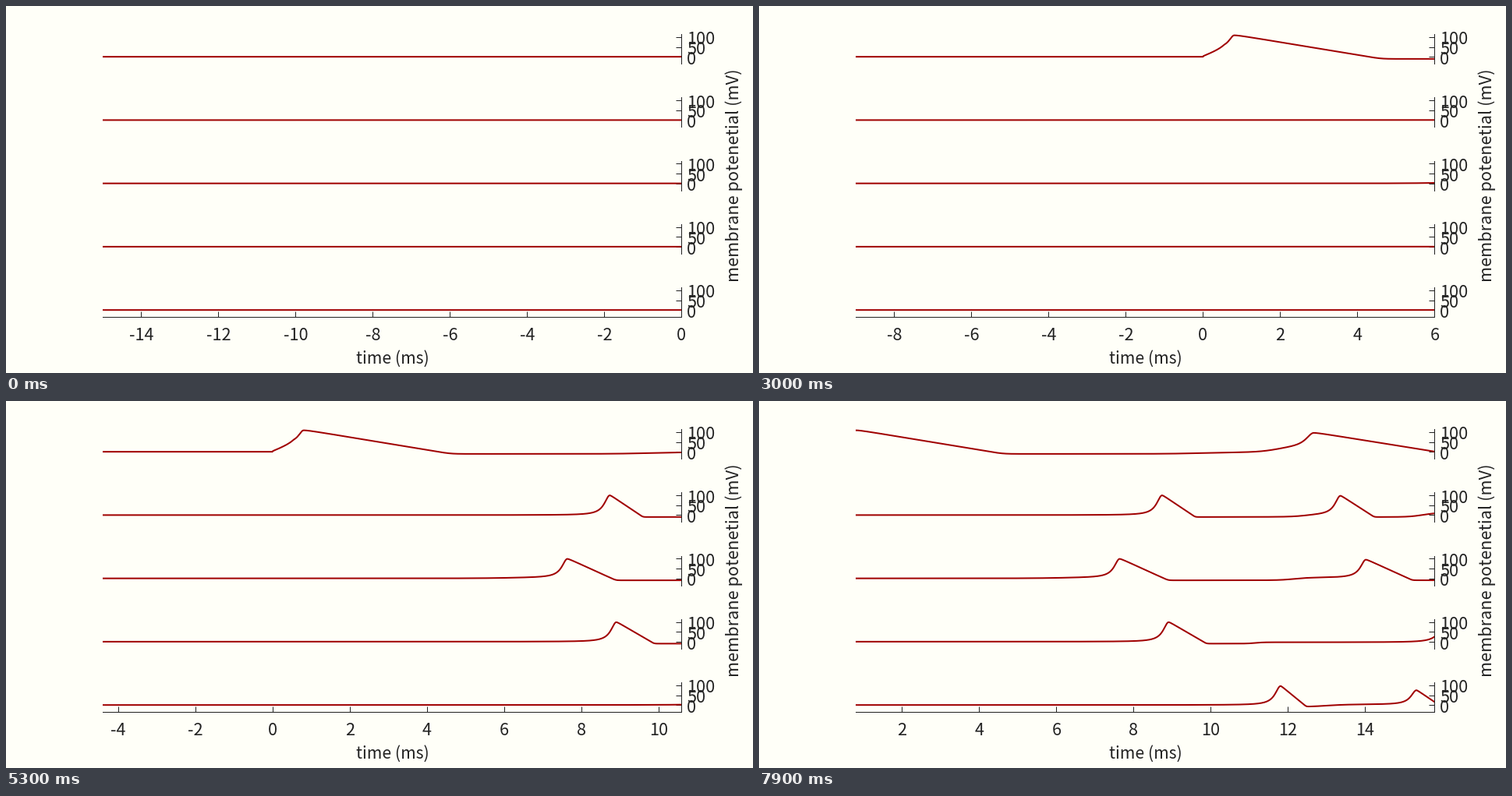
Recreate the animation shown at these times as a matplotlib script. Size 958 by 471 pixels, loop 8 s.

```python
import numpy as np
import matplotlib.pyplot as plt
from matplotlib.animation import FuncAnimation

W, H, DPI = 958, 471, 64
PX = 72 / DPI                      # points per pixel
FRAMES, STEP, SPAN = 80, 0.2, 15   # simulated ms per frame, visible ms
LEFT, WIDTH = 123.9, 742.5
HEIGHT, PITCH, BASE = 37.9, 81.25, 399.0
PAPER, INK, RED = "#fffff8", "#222222", "#a00000"

plt.rcParams.update({
    "font.family": "Noto Sans CJK JP",
    "text.color": INK,
    "axes.edgecolor": INK,
    "axes.linewidth": PX,
})

time = np.linspace(-SPAN, 16, 3101)


def push(v, at, size, width=0.18):
    """Sigmoid step of the membrane potential."""
    return v + size / (1 + np.exp(-(time - at) / width))


def fire(v, at, peak, fall, width=0.17):
    """Spike: accelerating foot, near-linear decay, soft landing below rest."""
    dt = time - at
    rise = v + (peak - np.interp(at, time, v)) / (1 + (dt / width) ** 2)
    u = np.maximum(dt, 0) / fall
    line = 1 - 1.33 * u * u / (u + 0.03)
    floor, soft = -0.1, 0.03
    decay = floor + soft * np.logaddexp(0, (line - floor) / soft)
    return np.where(dt < 0, rise, peak * decay)


def stimulated():
    v = fire(75 * np.clip(time, 0, 0.55), 0.81, 109, 4.45)
    v = push(v * (time > 0), 9.7, 7, 0.4)
    return fire(push(v, 11.7, 25, 0.25), 12.67, 96, 4.05, 0.25)


def second():
    v = push(fire(0 * time, 8.74, 100, 1), 12.45, 10)
    return push(fire(v, 13.36, 98, 1.02), 15.5, 22)


def third():
    v = fire(push(0 * time, 6.2, 4, 0.4), 7.64, 99, 1.47)
    return fire(push(v, 12.15, 13), 14.02, 95, 1.4)


def fourth():
    v = push(fire(0 * time, 8.91, 99, 1.14), 11.15, 7, 0.1)
    return fire(v, 16.07, 99, 1.14)


def fifth():
    v = push(fire(0 * time, 11.81, 96, 0.78), 13, 12, 0.25)
    return fire(v, 15.33, 75, 0.75)


fig = plt.figure(figsize=(W / DPI, H / DPI), dpi=DPI, facecolor=PAPER)
panels = []

for row, trace in enumerate([stimulated, second, third, fourth, fifth]):
    bottom = BASE - PITCH * (4 - row)
    ax = fig.add_axes([LEFT / W, 1 - bottom / H, WIDTH / W, HEIGHT / H],
                      facecolor="none")
    ax.set_ylim(-35, 115)
    ax.spines[["left", "top"]].set_visible(False)
    ax.spines["bottom"].set_visible(row == 4)
    ax.tick_params(direction="in", length=7 * PX, width=PX, color=INK,
                   labelcolor=INK, left=False, right=True, labelleft=False)
    ax.set_yticks([0, 50, 100])
    for v in (0, 50, 100):
        ax.annotate(str(v), (1, v), xycoords=ax.get_yaxis_transform(),
                    xytext=(6.8 * PX, -9.6 * PX), textcoords="offset points",
                    fontsize=21.7 * PX, va="baseline")
    ax.set_xticks([])
    ax.plot(time, trace(), color=RED, lw=2 * PX)
    panels.append(ax)

axis = panels[-1]
axis.tick_params(axis="x", pad=30.2 * PX, labelsize=21.7 * PX)
fig.text(495.7 / W, 1 - 458.5 / H, "time (ms)", fontsize=21.1 * PX,
         ha="center", va="baseline")
fig.text(940 / W, 1 - 217.3 / H, "membrane potenetial (mV)", fontsize=21.7 * PX,
         ha="center", va="baseline", rotation=90, rotation_mode="anchor")


def draw(n):
    now = round(n * STEP, 1)
    for ax in panels:
        ax.set_xlim(now - SPAN, now)
    ticks = [k for k in range(-14, 16, 2) if now - SPAN + 0.01 < k <= now]
    axis.set_xticks(ticks, [str(k) for k in ticks], va="baseline")
    return panels


anim = FuncAnimation(fig, draw, frames=FRAMES, interval=100, repeat=True,
                     repeat_delay=0, blit=False)
plt.show()
```
